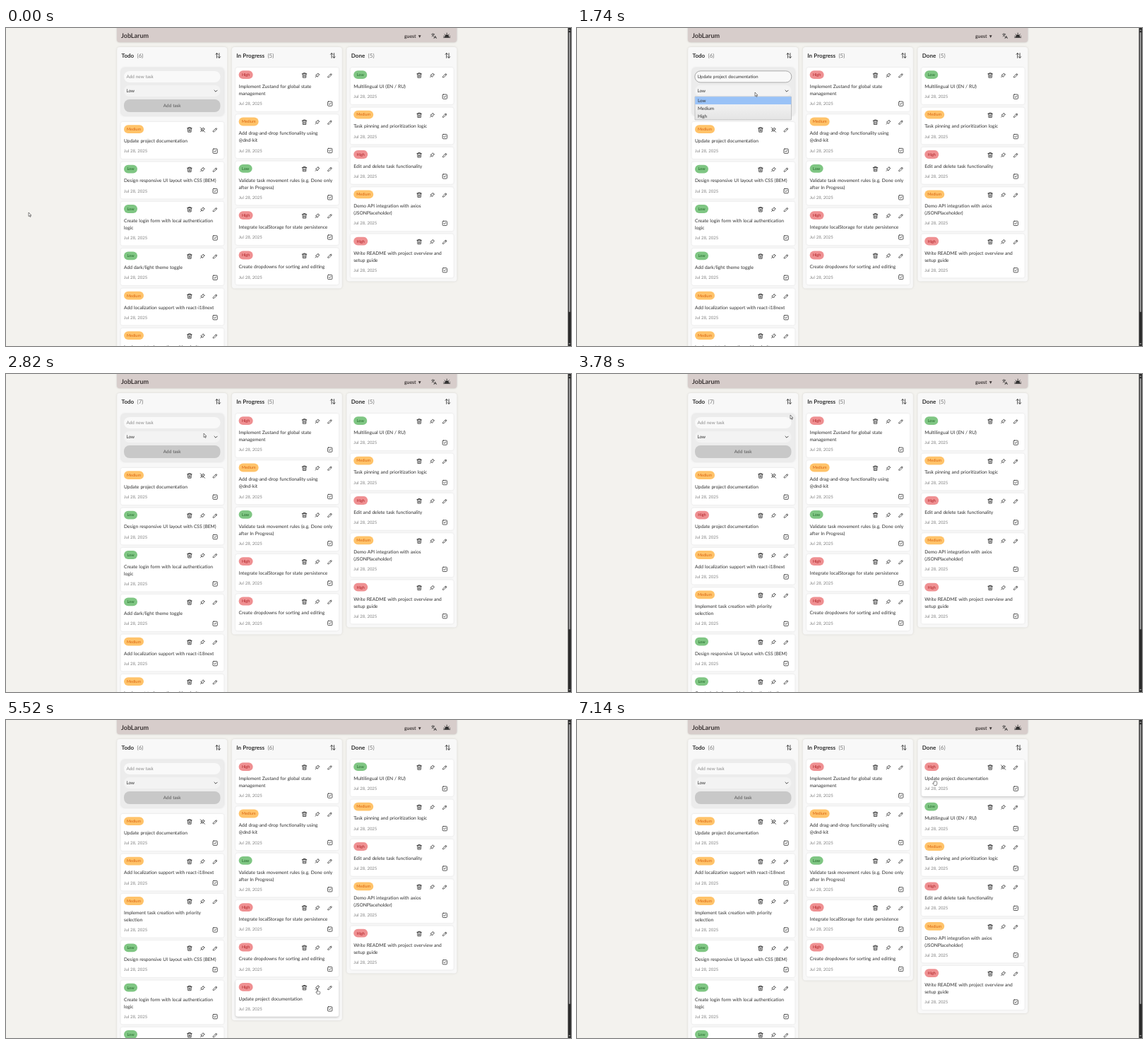
Animation of 800 by 450 pixels, one loop 7200 ms. Source, as an HTML page:

```html
<!DOCTYPE html>
<html lang="en">
<head>
<meta charset="utf-8">
<title>Task board</title>
<style>
html, body { margin: 0; width: 100%; height: 100%; overflow: hidden; background: #f3f2ee; }
svg { display: block; width: 800px; height: 450px; }
text { font: 6.65px Lato, "Open Sans", sans-serif; fill: #2e2e2e; word-spacing: .05em; text-rendering: geometricPrecision; }
.brand { font-size: 9px; font-weight: 700; fill: #3c3535; }
.user { font-size: 6.8px; font-weight: 700; fill: #3c3535; }
.head { font-size: 8px; font-weight: 700; }
.count { font-weight: 400; fill: #777; }
.field { font-size: 6.35px; }
.hint { fill: #8a8a8a; }
.date { font-size: 6px; fill: #808080; }
.badge { font-size: 5.5px; text-anchor: middle; }
.icon { fill: none; stroke: #262626; stroke-width: 2.2; stroke-linecap: round; stroke-linejoin: round; }
.col { fill: #f8f8f8; filter: drop-shadow(0 .6px 1.6px rgba(0,0,0,.12)); }
.card > rect:first-child { fill: #fff; filter: drop-shadow(0 .5px 1px rgba(0,0,0,.11)); }
.card.lift > rect:first-child { filter: drop-shadow(0 1px 1.8px rgba(0,0,0,.24)); }
.cursor { fill: #fff; stroke: #222; stroke-width: .55; stroke-linejoin: round; }
</style>
</head>
<body>
<svg id="stage" viewBox="0 0 800 450" xmlns="http://www.w3.org/2000/svg">
  <defs>
    <g id="trash"><path d="M3 6h18M8 6V3h8v3M5 6l1 15h12l1-15M10 11v6M14 11v6"/></g>
    <g id="pin"><path d="M15 4.5l-4 4-4 1.5-1.5 1.5 7 7 1.5-1.5 1.5-4 4-4M9 15l-4.5 4.5M14.5 4L20 9.5"/></g>
    <g id="unpin"><use href="#pin"/><path d="M4 3l17 18"/></g>
    <g id="edit"><path d="M4 20h4L18.5 9.5a2.8 2.8 0 1 0-4-4L4 16zM13.5 6.5l4 4"/></g>
    <g id="check"><rect x="3" y="3" width="18" height="18" rx="3"/><path d="M8 12l3 3 5-6"/></g>
    <g id="sort"><path d="M7.500 21V3M3 7.500L7.500 3 12 7.500M16.500 3v18M12 16.500l4.500 4.500 4.500-4.500"/></g>
    <g id="lang"><path d="M5 8l6 6M4 14l6-6 2-3M2 5h12M7 2h1M22 22l-5-10-5 10M14 18h6"/></g>
    <g id="dusk"><path d="M5 17a7 7 0 0 1 14 0z" fill="#262626"/><path d="M0 20h24M12 3v4M3.500 7.500l2.500 2.500M20.500 7.500L18 10M0 15h2M22 15h2"/></g>
    <linearGradient id="menuFill" x2="0" y2="1">
      <stop stop-color="#f8f8f8"/><stop offset="1" stop-color="#e4e4e4"/>
    </linearGradient>
  </defs>
</svg>
<script>
const LOOP = 7200, STEP = 60;
const COL_X = [157.2, 319.8, 482.4], CARD_DX = 5.3, CARD_W = 146;
const FIRST_Y = [133, 56, 56];
const TONES = {
  Low: ['#7fc683', '#1f6426', 19],
  Medium: ['#ffc36a', '#d9620f', 28],
  High: ['#ef9092', '#ad2024', 20]
};
const TASK = 'Update project documentation';
const CARDS = {
  docs: ['Medium', TASK],
  layout: ['Low', 'Design responsive UI layout with CSS (BEM)'],
  login: ['Low', 'Create login form with local authentication', 'logic'],
  theme: ['Low', 'Add dark/light theme toggle'],
  locale: ['Medium', 'Add localization support with react-i18next'],
  create: ['Medium', 'Implement task creation with priority', 'selection'],
  store: ['High', 'Implement Zustand for global state', 'management'],
  drag: ['Medium', 'Add drag-and-drop functionality using', '@dnd-kit'],
  rules: ['Low', 'Validate task movement rules (e.g. Done only', 'after In Progress)'],
  persist: ['High', 'Integrate localStorage for state persistence'],
  menus: ['High', 'Create dropdowns for sorting and editing'],
  i18n: ['Low', 'Multilingual UI (EN / RU)'],
  pinning: ['Medium', 'Task pinning and prioritization logic'],
  remove: ['High', 'Edit and delete task functionality'],
  api: ['Medium', 'Demo API integration with axios', '(JSONPlaceholder)'],
  readme: ['High', 'Write README with project overview and', 'setup guide'],
  fresh: ['High', TASK]
};

// Moments of the clicks and drags
const T = { focus: 600, paste: 1260, open: 1680, pick: 2220, add: 2460, sort: 3240,
            grab: 4260, drop: 4860, pin: 5640, grab2: 6720, drop2: 7080 };

// Pointer path: time, x, y
const PATH = [
  [0, 32, 261], [60, 40, 253], [360, 228, 66], [1260, 228, 66], [1680, 252, 91], [1740, 252, 91],
  [1980, 234, 124], [2040, 234, 125], [2220, 234, 125], [2400, 236, 109], [2580, 236, 109],
  [2820, 280, 84], [2940, 298, 37], [3060, 299, 38], [3300, 299, 38], [3720, 301, 44], [3780, 302, 58],
  [4200, 243, 214.4], [4260, 243, 214.4], [4740, 390, 163], [4860, 392, 164], [5520, 441, 381],
  [5700, 441, 381], [6240, 370, 86], [6720, 370, 86], [7080, 507, 86], [7200, 507, 86]
];
// Pointer shape from a given time on
const SHAPES = [
  [0, 'arrow'], [300, 'beam'], [1380, 'arrow'], [2340, 'point'], [2640, 'arrow'], [2900, 'point'],
  [3720, 'arrow'], [3960, 'open'], [T.grab, 'fist'], [T.drop, 'open'], [5460, 'point'],
  [5760, 'open'], [T.grab2, 'fist'], [T.drop2, 'open']
];

const stage = document.getElementById('stage');
const $ = id => document.getElementById(id);
const rect = (x, y, w, h, r, fill, more = '') =>
  `<rect x="${x}" y="${y}" width="${w}" height="${h}" rx="${r}" fill="${fill}" ${more}/>`;
const text = (x, y, s, cls = '', more = '') => `<text x="${x}" y="${y}" class="${cls}" ${more}>${s}</text>`;
const icon = (name, x, y, k = .36, more = '') =>
  `<g class="icon" transform="translate(${x} ${y}) scale(${k}) translate(-12 -12)"><use href="#${name}" ${more}/></g>`;
const show = (id, on) => { $(id).style.display = on ? '' : 'none'; };
const put = (el, x, y) => el.setAttribute('transform', `translate(${x} ${y})`);

function cardMarkup(id) {
  const [level, ...lines] = CARDS[id];
  const [fill, ink, w] = TONES[level];
  const extra = (lines.length - 1) * 10;
  return `<g class="card" id="${id}">` +
    rect(0, 0, CARD_W, 52 + extra, 3, '#fff') +
    rect(4.5, 4.3, w, 11.8, 5.9, fill) +
    text(4.5 + w / 2, 12.1, level, 'badge', `style="fill:${ink}"`) +
    icon('trash', 97.4, 11) +
    icon('pin', 115.7, 11, .36, `id="${id}-pin"`) +
    icon('edit', 133.6, 11.2, .33) +
    lines.map((s, i) => text(4.5, 29.1 + i * 10, s)).join('') +
    text(4.5, 43.3 + extra, 'Jul 28, 2025', 'date') +
    icon('check', 133.6, 41.2 + extra, .35) + '</g>';
}

function columnMarkup(name, i) {
  const x = COL_X[i];
  return rect(x, 27, 156, 400, 4, '#f8f8f8', `class="col" id="col${i}"`) +
    text(x + 6.4, 41.5, `${name}<tspan dx="4.4" class="count" id="count${i}"></tspan>`, 'head') +
    icon('sort', x + 143, 39, .37);
}

const form =
  rect(163, 56.5, 145.500, 67.5, 5, '#ececec', 'style="filter:drop-shadow(0 .8px 1.6px rgba(0,0,0,.14))"') +
  rect(167, 61, 136.5, 16, 8, '#f9f9f9') +
  rect(166.8, 60.8, 137, 16.2, 8.1, 'none', 'id="ring" stroke="#999" stroke-width=".8"') +
  text(170.5, 71, 'Add new task', 'field hint', 'id="hint"') +
  text(170.5, 71, TASK, 'field', 'id="typed"') +
  rect(170.6, 64.3, .6, 8.6, 0, '#222', 'id="caret"') +
  rect(167, 81, 136.5, 16, 8, '#f3f3f3') +
  text(170.5, 91.2, 'Low', 'field', 'id="level"') +
  '<path d="M294.700 87.900l2.300 2.300 2.300-2.300" fill="none" stroke="#222" stroke-width=".8"/>' +
  rect(167, 101, 136.5, 18, 8, '#c8c8c8') +
  text(235.2, 112.2, 'Add task', 'field', 'text-anchor="middle" style="fill:#555"');

const menu = '<g id="menu">' +
  rect(167, 97, 136.5, 33, .5, 'url(#menuFill)', 'stroke="#999" stroke-width=".5"') +
  rect(167.2, 97.2, 136.1, 10.9, 0, '#99c2f7', 'id="mark"') +
  ['Low', 'Medium', 'High'].map((s, i) => text(171, 104.9 + i * 11, s, 'field')).join('') + '</g>';

const hand = d => `<path d="${d}"/>`;
const pointers = {
  arrow: '<path d="M0 0v5.600l1.300-1.200.9 2 .9-.4-.9-1.900h1.700z"/>',
  beam: '<path d="M-1.200-3.500h2.400M0-3.500v7M-1.200 3.500h2.400"/>',
  point: hand('M-.6 .5q.6-1 1.200 0v2.300l2.600.6q.8.3.6 1.200l-.6 2.400h-3.400l-2-2.700q.1-.9.9-.5l.7.6z'),
  open: hand('M-1.800 1.200q.5-.9 1 0q.4-1.600 1.100-.5q.6-.9 1.100.2q.8-.5 1.100.4l.4 2.600-.9 2.700h-3.200l-2.200-2.700q.1-.8.8-.5l.8.5z'),
  fist: hand('M-1.500 2q.6-1 1.200-.2q.6-.8 1.200 0q.6-.6 1.200.1q.8-.2.8.7l-.1 2-.8 1.800h-2.800l-1.500-1.900q-.2-1.100.8-1.100z')
};

stage.insertAdjacentHTML('beforeend',
  rect(157, -5, 481.300, 25.300, 4, '#d7cdcb', 'style="filter:drop-shadow(0 .5px 1.200px rgba(0,0,0,.18))"') +
  text(163, 14.3, 'JobLarum', 'brand') +
  text(564, 14.2, 'guest', 'user') +
  '<path d="M583.800 10.300h3.800l-1.900 3.600z" fill="#3c3535"/>' +
  icon('lang', 606, 11.3, .34) + icon('dusk', 624.2, 10.5, .38) +
  ['Todo', 'In Progress', 'Done'].map(columnMarkup).join('') +
  form + Object.keys(CARDS).map(cardMarkup).join('') + menu +
  rect(795.6, 0, 4.4, 450, 0, '#2c2c2c') +
  rect(796.9, 6, 2, 396, 1, '#9d9d9d', 'id="thumb"') +
  '<path d="M796.500 4l1.400-2 1.400 2zM796.500 446l1.400 2 1.400-2z" fill="#9d9d9d"/>' +
  '<g id="pointer" class="cursor"></g>');

const doing = ['store', 'drag', 'rules', 'persist', 'menus'];
const done = ['i18n', 'pinning', 'remove', 'api', 'readme'];
const unsorted = ['docs', 'layout', 'login', 'theme', 'locale', 'create'];
const sorted = ['docs', 'locale', 'create', 'layout', 'login', 'theme'];

function board(t) {
  const lists = [t < T.sort ? [...unsorted] : [...sorted], [...doing], [...done]];
  if (t >= T.add && t < T.sort) lists[0].push('fresh');
  else if (t >= T.sort && t < T.grab) lists[0].splice(1, 0, 'fresh');
  else if (t >= T.drop && t < T.pin) lists[1].push('fresh');
  else if (t >= T.pin && t < T.grab2) lists[1].unshift('fresh');
  else if (t >= T.drop2) lists[2].unshift('fresh');
  return lists;
}

function pointerAt(t) {
  const i = Math.max(1, PATH.findIndex(p => p[0] >= t));
  const [t0, x0, y0] = PATH[i - 1], [t1, x1, y1] = PATH[i];
  const k = (t - t0) / (t1 - t0);
  return [x0 + (x1 - x0) * k, y0 + (y1 - y0) * k];
}

let shape = '';
function render(t) {
  const lists = board(t);
  const [px, py] = pointerAt(t);
  const held = (t >= T.grab && t < T.drop) || (t >= T.grab2 && t < T.drop2);

  lists.forEach((list, c) => {
    let y = FIRST_Y[c];
    for (const id of list) {
      put($(id), COL_X[c] + CARD_DX, y);
      y += CARDS[id].length > 2 ? 66.3 : 56.4;
    }
    $('col' + c).setAttribute('height', y + .8 - 27);
  });

  // A held card still counts for the column it came from
  const home = t < T.drop ? 0 : 1;
  lists.forEach((list, c) => {
    $('count' + c).textContent = `(${list.length + (held && c === home ? 1 : 0)})`;
  });

  if (held) {
    const from = t < T.drop ? T.grab : T.grab2;
    const [sx, sy] = pointerAt(from);
    put($('fresh'), COL_X[home] + CARD_DX + px - sx, (home ? FIRST_Y[1] : FIRST_Y[0] + 56.4) + py - sy);
  }
  show('fresh', t >= T.add);
  $('fresh').classList.toggle('lift', t >= T.grab);
  $('docs-pin').setAttribute('href', '#unpin');
  $('fresh-pin').setAttribute('href', t >= T.pin ? '#unpin' : '#pin');

  const filled = t >= T.paste && t < T.add;
  show('ring', t >= T.focus && t < T.pick);
  show('caret', t >= T.focus && t < 900);
  show('hint', !filled);
  show('typed', filled);
  $('level').textContent = t >= T.pick && t < T.add ? 'High' : 'Low';
  show('menu', t >= T.open && t < T.pick);
  const row = Math.min(2, Math.max(0, Math.floor((py - 97) / 11)));
  $('mark').setAttribute('y', 97.2 + row * 10.9);
  $('thumb').setAttribute('height', t >= T.add && t < T.grab ? 355.5 : 396);

  const next = SHAPES.filter(s => s[0] <= t).pop()[1];
  if (next !== shape) $('pointer').innerHTML = pointers[shape = next];
  put($('pointer'), px, py);
}

function tick(now) {
  render(Math.floor((now % LOOP) / STEP) * STEP);
  requestAnimationFrame(tick);
}
render(0);
requestAnimationFrame(tick);
</script>
</body>
</html>
```
